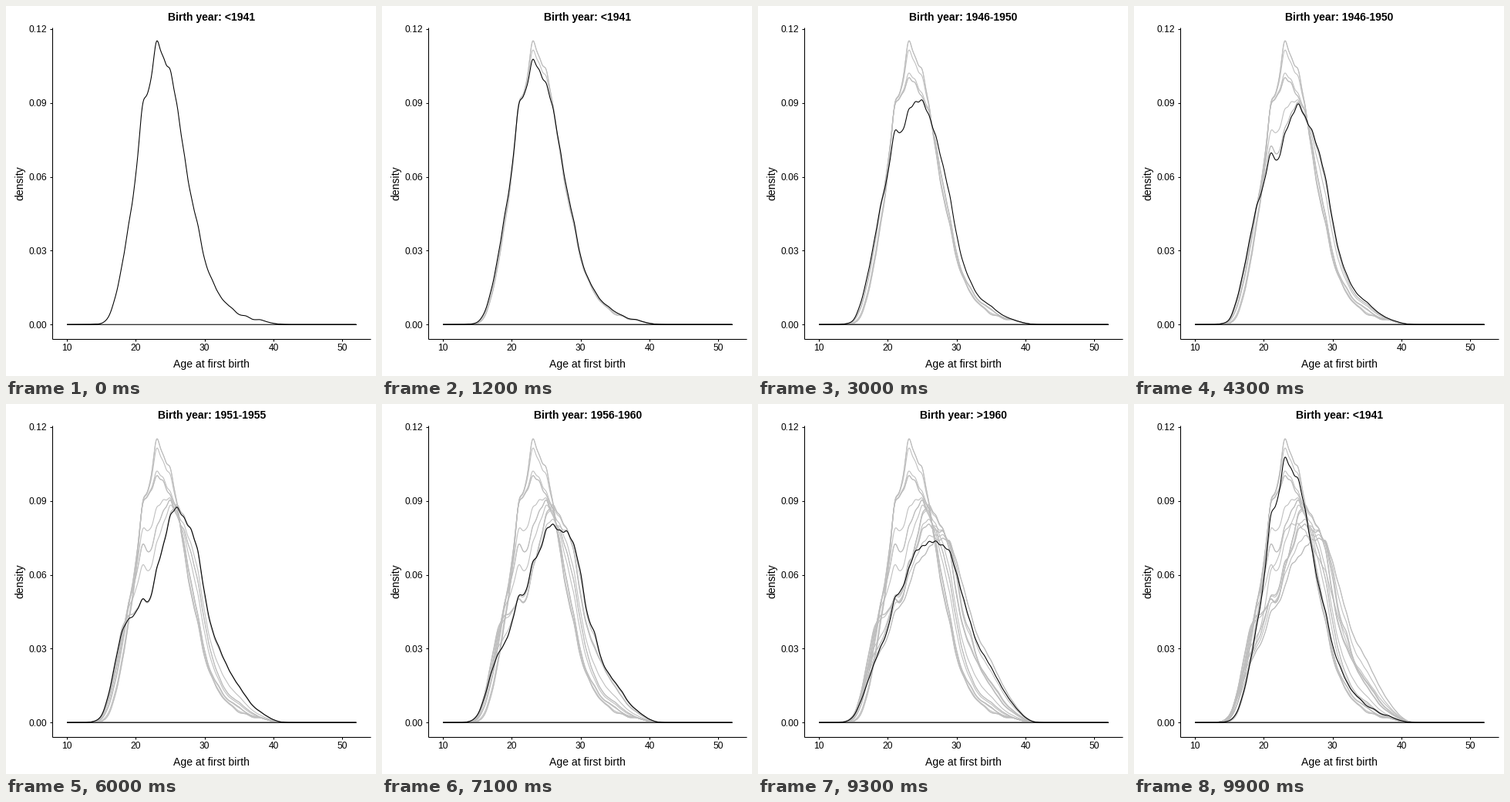
A matplotlib script that plays this animation: 480 px wide and 480 px high, repeating every 10000 ms.

```python
import numpy as np
import matplotlib.pyplot as plt
from matplotlib.animation import FuncAnimation

SIZE, DPI = 480, 96
PX = 72 / DPI               # points per pixel
FRAMES, STEP = 100, 100     # frame count, ms per frame
BLEND, TRAIL = 8, 5         # frames per transition, spacing of the grey trail
LEFT, RIGHT, TOP, BOTTOM = 60.3, 473, 27.7, 431.6
BANDWIDTH = 0.55

plt.rcParams["font.family"] = "Liberation Sans"

# Density at ages 15 to 38, in units of 0.0001
COHORTS = {
    "<1941": [5, 30, 110, 242, 414, 610, 895, 970, 1150, 1087, 1035, 890,
              700, 527, 407, 265, 188, 128, 90, 66, 41, 35, 21, 20],
    "1941-1945": [15, 66, 170, 315, 487, 655, 887, 934, 1002, 981, 925, 865,
                  734, 577, 440, 292, 200, 151, 104, 82, 63, 41, 27, 21],
    "1946-1950": [21, 93, 208, 350, 492, 592, 724, 695, 793, 860, 904, 840,
                  783, 693, 577, 410, 277, 193, 134, 102, 83, 58, 38, 23],
    "1951-1955": [28, 111, 248, 383, 436, 455, 501, 496, 620, 726, 848, 885,
                  841, 788, 696, 515, 382, 305, 245, 190, 146, 104, 67, 45],
    "1956-1960": [31, 101, 201, 279, 326, 405, 514, 533, 649, 696, 784, 806,
                  782, 778, 725, 608, 440, 367, 260, 204, 164, 126, 82, 54],
    ">1960": [29, 89, 167, 239, 296, 351, 449, 482, 549, 640, 673, 714,
              743, 749, 737, 654, 550, 448, 356, 303, 252, 193, 138, 91],
}
NAMES = list(COHORTS)
STARTS = [9, 26, 43, 60, 77, 93]    # first frame of each transition

ages = np.arange(14, 42)
grid = np.linspace(10, 52, 512)


def kernel(x):
    return np.exp(-0.5 * ((x[:, None] - ages) / BANDWIDTH) ** 2)


def density(levels):
    """Sum of normal kernels on whole ages passing through the levels."""
    first, last = levels[0], levels[-1]
    full = [0.2 * first, *levels, 0.58 * last, 0.25 * last, 0.06 * last]
    weights = np.linalg.solve(kernel(ages), np.array(full) / 1e4)
    return np.maximum(kernel(grid) @ weights, 0)


curves = [density(v) for v in COHORTS.values()]


def to_x(age):
    return LEFT + (np.asarray(age) - 7.9) * (RIGHT - LEFT) / 46.2


def to_y(d):
    unit = (BOTTOM - TOP) / 1.1
    return BOTTOM - 0.05 * unit - np.asarray(d) * unit / 0.115


def pose(frame):
    """Cohort curve and name at a frame, blended linearly."""
    i = max(sum(frame >= s for s in STARTS) - 1, 0)
    t = np.clip((frame - STARTS[i] + 1) / BLEND, 0, 1)
    j = (i + 1) % len(NAMES)
    return (1 - t) * curves[i] + t * curves[j], NAMES[j if t > 0.5 else i]


def outline(d):
    xs = to_x(grid)
    base = to_y(0)
    return np.r_[xs, xs[::-1], xs[0]], np.r_[to_y(d), np.full(len(xs), base), base]


fig = plt.figure(figsize=(SIZE / DPI, SIZE / DPI), dpi=DPI, facecolor="white")
ax = fig.add_axes([0, 0, 1, 1])
ax.set(xlim=(0, SIZE), ylim=(SIZE, 0))
ax.axis("off")


def stroke(x, y, color="black", z=2):
    return ax.plot(x, y, color=color, lw=1.07 * PX, zorder=z,
                   solid_capstyle="butt", solid_joinstyle="round")[0]


def label(x, y, s, size, ha="center", **kw):
    return ax.text(x, y, s, fontsize=size * PX, ha=ha, va="baseline", **kw)


stroke([LEFT, LEFT], [TOP, BOTTOM + 0.5])
stroke([LEFT - 0.5, RIGHT], [BOTTOM, BOTTOM])
for age in range(10, 51, 10):
    stroke([to_x(age)] * 2, [BOTTOM, BOTTOM + 3.5])
    label(to_x(age), 447.3, str(age), 12)
for d in np.arange(5) * 0.03:
    stroke([LEFT - 3.5, LEFT], [to_y(d)] * 2)
    label(53.5, to_y(d) + 4.3, f"{d:.2f}", 12, ha="right")

MID = (LEFT + RIGHT) / 2
label(MID, 469, "Age at first birth", 14)
ax.text(22, (TOP + BOTTOM) / 2, "density", fontsize=14 * PX, rotation=90,
        rotation_mode="anchor", ha="center", va="baseline")
title = label(MID, 19, "", 14, weight="bold")

trail = {f: stroke(*outline(pose(f)[0]), color="#bebebe", z=3)
         for f in range(0, FRAMES, TRAIL)}
current = stroke([], [], z=4)


def update(frame):
    d, name = pose(frame)
    current.set_data(*outline(d))
    title.set_text(f"Birth year: {name}")
    for f, line in trail.items():
        line.set_visible(f < frame)
    return [current, title, *trail.values()]


anim = FuncAnimation(fig, update, frames=FRAMES, interval=STEP,
                     init_func=lambda: update(0), repeat=True, repeat_delay=0)
plt.show()
```
